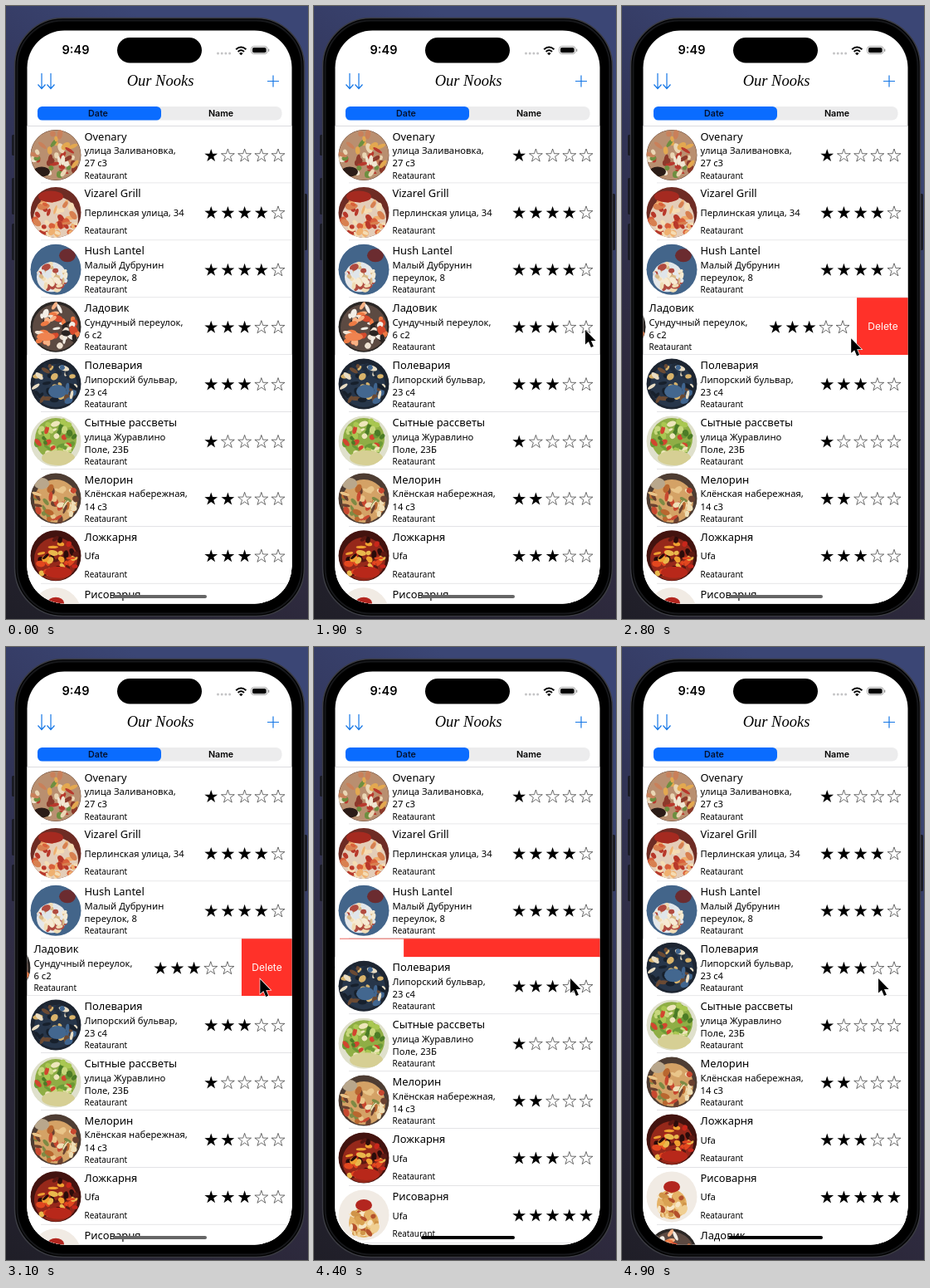
Recreate the animation shown at these times as an HTML page. Size 364x738 px, loop 5.1 s.

```html
<!DOCTYPE html>
<html lang="ru">
<head>
<meta charset="utf-8">
<style>
  html, body { margin: 0; width: 100%; height: 100%; overflow: hidden; background: #2b2d4e; }
  svg { display: block; width: 364px; height: 738px; }
  text { font-family: "Noto Sans", sans-serif; }
  .ui { font-family: Inter, sans-serif; }
  .name { font-size: 12.9px; }
  .address { font-size: 11.2px; }
  .kind { font-size: 9.9px; }
  .heading { font: italic 18.5px "Liberation Serif", serif; }
  .line { stroke: #d4d4d7; stroke-width: .8; }
  .icon { fill: none; stroke: #1677e6; stroke-width: 1.2; }
</style>
</head>
<body>
<svg id="stage" viewBox="0 0 364 738"></svg>
<script>
const LOOP = 5100, STEP = 100;
const TOP = 144.5, ROW = 68.9, LEFT = 25, RIGHT = 345, BUTTON = 61;
const SWIPED = 3;

// photo: background, plate [x, y, radius, colour], accent [x, y, rx, ry, colour], food colours
const places = [
  { name: 'Ovenary', address: ['улица Заливановка,', '27 с3'], stars: 1,
    photo: ['#6b4a38', [0, 0, 30, '#b98f70'], [-17, 20, 10, 6, '#2b1c17'],
      ['#ead6b4', '#b8382c', '#6d8f40', '#e3a850', '#8c3a2b', '#f1e6d2', '#c9805a']] },
  { name: 'Vizarel Grill', address: ['Перлинская улица, 34'], stars: 4,
    photo: ['#6e2c24', [0, 8, 27, '#e4cdb8'], [-6, -19, 15, 7, '#a52a20'],
      ['#d9603a', '#efb070', '#b8382a', '#f4dcb4', '#d88050']] },
  { name: 'Hush Lantel', address: ['Малый Дубрунин', 'переулок, 8'], stars: 4,
    photo: ['#43658a', [-5, 9, 18, '#e6e8ea'], [14, -17, 10, 8, '#6b2c30'],
      ['#f0dcb4', '#f6ead2', '#d9b987', '#b04a3f', '#dfe5ea']] },
  { name: 'Ладовик', address: ['Сундучный переулок,', '6 с2'], stars: 3,
    photo: ['#2b2725', [0, 1, 28, '#5c4a42'], [-12, 12, 11, 5, '#ef8350'],
      ['#ee7a43', '#f3eee6', '#d64a2c', '#f7b184', '#2a2422', '#f0e2d2']] },
  { name: 'Полевария', address: ['Липорский бульвар,', '23 с4'], stars: 3,
    photo: ['#1d2531', [0, 2, 26, '#27364a'], [2, 9, 11, 8, '#43678f'],
      ['#40658f', '#d9b36a', '#17202c', '#e9ddc4', '#6b4a33', '#202c3c']] },
  { name: 'Сытные рассветы', address: ['улица Журавлино', 'Поле, 23Б'], stars: 1,
    photo: ['#dfe0cc', [0, -3, 25, '#8fae45'], [3, 20, 20, 9, '#d6cf94'],
      ['#6a9a36', '#a9c751', '#d2452f', '#4c7c26', '#eee6bb', '#c7d77c']] },
  { name: 'Мелорин', address: ['Клёнская набережная,', '14 с3'], stars: 2,
    photo: ['#4e3d33', [0, 3, 26, '#d4a266'], [-17, -18, 9, 7, '#b9a78c'],
      ['#e9c58a', '#c8482f', '#7d8a44', '#f0dfb6', '#b9672f', '#6a4130']] },
  { name: 'Ложкарня', address: ['Ufa'], stars: 3,
    photo: ['#43130f', [0, 4, 26, '#96281a'], [3, 20, 16, 7, '#b8281a'],
      ['#e2471f', '#f0a030', '#2b0c0a', '#c8261b', '#e9b84c', '#5c1812']] },
  { name: 'Рисоварня', address: ['Ufa'], stars: 5,
    photo: ['#f1ebe4', [0, 9, 18, '#e5b266'], [0, -12, 10, 7, '#b3261f'],
      ['#f0cf92', '#d09448', '#f7e7c6', '#d9a152', '#b4502c']] }
];
places.push(places[SWIPED]);

function random(seed) {
  return () => (seed = seed * 16807 % 2147483647) / 2147483647;
}

const ellipse = (rx, ry, fill, x, y, turn = 0) =>
  `<ellipse rx="${rx}" ry="${ry}" fill="${fill}" transform="translate(${x} ${y}) rotate(${turn})"/>`;

function photo([back, [px, py, pr, plate], [ax, ay, arx, ary, accent], foods], seed) {
  const rnd = random(seed);
  let art = ellipse(31, 31, back, 0, 0) + ellipse(pr, pr, plate, px, py);
  for (let i = 0; i < 44; i++) {
    const angle = rnd() * 7, reach = Math.sqrt(rnd()) * (pr - 1);
    const x = px + reach * Math.cos(angle), y = py + reach * Math.sin(angle);
    art += ellipse(2.5 + rnd() * 4, 1.5 + rnd() * 2.5, foods[i % foods.length], x, y, rnd() * 180);
  }
  art += ellipse(arx, ary, accent, ax, ay);
  return `<g transform="translate(60 35)" clip-path="url(#disc)">${art}</g>`;
}

function star(x, filled) {
  const points = Array.from({ length: 10 }, (_, i) => {
    const r = i % 2 ? 3.2 : 8.3, a = i * Math.PI / 5;
    return `${x + r * Math.sin(a)},${35.8 - r * Math.cos(a)}`;
  }).join(' ');
  return `<polygon points="${points}" ${filled ? 'fill="#000"' : 'fill="none" stroke="#333" stroke-width=".7"'}/>`;
}

const text = (kind, x, y, value, extra = '') =>
  `<text class="${kind}" x="${x}" y="${y}" ${extra}>${value}</text>`;

const rect = (x, y, w, h, fill, r = 0, extra = '') =>
  `<rect x="${x}" y="${y}" width="${w}" height="${h}" rx="${r}" fill="${fill}" ${extra}/>`;

function cell(place, i) {
  const { name, address, stars } = place, single = address.length === 1;
  return `<g transform="translate(0 ${TOP + ROW * i})">
    ${rect(LEFT, 0, RIGHT - LEFT, ROW, '#fff')}
    ${photo(place.photo, 911 * (places.indexOf(place) + 3))}
    ${text('name', 94.5, 17, name)}
    ${address.map((part, n) => text('address', 94.5, single ? 39.6 : 33.6 + 15.3 * n, part)).join('')}
    ${text('kind', 94.5, single ? 61 : 63, 'Reataurant')}
    ${[0, 1, 2, 3, 4].map(n => star(247.2 + 20.2 * n, n < stars)).join('')}
    <path class="line" d="M42 ${ROW - .3}H${RIGHT}"/>
  </g>`;
}

const cells = places.map(cell);
const swipeTop = TOP + ROW * SWIPED, belowTop = swipeTop + ROW;
const downArrow = x => `<path class="icon" d="M${x} 81V99M${x - 4.5} 94.5L${x} 99.5L${x + 4.5} 94.5"/>`;

stage.innerHTML = `
  <defs>
    <linearGradient id="dusk" x1=".4" x2="0" y2="1">
      <stop stop-color="#3b4675"/><stop offset=".3" stop-color="#313457"/>
      <stop offset=".6" stop-color="#2f2b40"/><stop offset="1" stop-color="#1f1e27"/>
    </linearGradient>
    <clipPath id="disc"><circle r="30.5"/></clipPath>
    <clipPath id="screen"><rect x="25.5" y="29.5" width="319" height="690" rx="45"/></clipPath>
  </defs>
  ${rect(0, 0, 364, 738, 'url(#dusk)')}
  ${[[7, 155, 25], [7, 207, 44], [7, 262, 44], [358, 226, 68]].map(([x, y, h]) => rect(x, y, 5, h, '#191a22', 1.5)).join('')}
  ${rect(10.5, 14.5, 349, 720, '#000', 58, 'stroke="#3a3b42" stroke-width="1.6"')}
  ${rect(13.5, 17.5, 343, 714, '#000', 55, 'stroke="#17181b" stroke-width="2"')}
  <g clip-path="url(#screen)">
    ${rect(LEFT, 29, RIGHT - LEFT, 691, '#fff')}
    ${cells.slice(0, SWIPED).join('')}
    <g id="swipe">
      ${cells[SWIPED]}
      ${rect(RIGHT, swipeTop, RIGHT - LEFT, ROW, '#ff3129')}
    </g>
    <g id="label">${text('ui', 314.5, swipeTop + 39, 'Delete', 'text-anchor="middle" font-size="12" fill="#fff"')}</g>
    <path id="edge" stroke="#e8564f" stroke-width=".9" d="M31 ${swipeTop}H${RIGHT}"/>
    <g id="below">${rect(LEFT, belowTop, RIGHT - LEFT, 460, '#fff')}${cells.slice(SWIPED + 1).join('')}</g>
    <path class="line" d="M${LEFT} ${TOP}H${RIGHT}"/>
    ${rect(129, 709, 113, 4, '#000', 2, 'id="home"')}
  </g>
  ${rect(134, 38, 102, 30.5, '#000', 15.2)}
  ${text('ui', 84, 58, '9:49', 'text-anchor="middle" font-size="14.5" font-weight="600"')}
  ${[255.5, 260.2, 264.9, 269.6].map(x => `<circle cx="${x}" cy="57" r="1.5" fill="#c4c4c6"/>`).join('')}
  <g fill="none" stroke="#000" stroke-width="2">
    <path d="M277.2 52.2Q283.3 46.8 289.4 52.2M279.6 54.9Q283.3 51.6 287 54.9"/>
  </g>
  <path d="M281 57Q283.3 55 285.6 57L283.3 59.3Z"/>
  ${rect(295.6, 48.6, 19.4, 9, '#fff', 3, 'stroke="#999" stroke-width=".9"')}
  ${rect(297, 50, 16.6, 6.2, '#000', 1.8)}
  ${rect(316, 51.5, 1.3, 3.4, '#999', .6)}
  ${downArrow(43)}${downArrow(54)}
  <path class="icon" d="M315 90.5H329M322 83.5V97.5"/>
  ${text('heading', 186, 96, 'Our Nooks', 'text-anchor="middle"')}
  ${rect(38, 121, 294.5, 16.5, '#ececed', 7)}
  ${rect(38, 121, 149, 16.5, '#0a6cff', 5.5)}
  ${text('ui', 111, 133, 'Date', 'text-anchor="middle" font-size="10.7" font-weight="600" fill="#04122e"')}
  ${text('ui', 259, 133, 'Name', 'text-anchor="middle" font-size="10.7" font-weight="600"')}
  <path id="cursor" d="M0 0V17.6L4 14L6.9 21L9.9 19.8L7 13H12.6Z" stroke="#fff" stroke-width="1.3" paint-order="stroke"/>`;

// time, x, y
const pointer = [
  [200, 374, 540], [800, 315, 454], [1700, 327, 390], [1900, 327, 390],
  [2400, 191, 401], [3000, 306, 400], [3500, 309, 399]
];
const [, , , dragStart, dragEnd] = pointer;
const slack = 23, deleteAt = 4300;

function pointerAt(t) {
  const next = pointer.findIndex(key => key[0] > t);
  if (next <= 0) return pointer.at(next).slice(1);
  const [t0, x0, y0] = pointer[next - 1], [t1, x1, y1] = pointer[next];
  const u = (t - t0) / (t1 - t0), e = u * u * (3 - 2 * u);
  return [x0 + (x1 - x0) * e, y0 + (y1 - y0) * e];
}

function swipeOffset(t, x, removed) {
  if (t < dragStart[0]) return 0;
  const dragged = at => Math.max(0, dragStart[1] - at - slack);
  if (t <= dragEnd[0]) return dragged(x);
  const settled = BUTTON + (dragged(dragEnd[1]) - BUTTON) * Math.exp((dragEnd[0] - t) / 100);
  return settled + (RIGHT - LEFT - BUTTON) * removed;
}

const move = (node, x, y) => node.setAttribute('transform', `translate(${x} ${y})`);
const show = (node, visible) => node.style.display = visible ? '' : 'none';
const [swipe, below, label, edge, home, cursor] =
  ['swipe', 'below', 'label', 'edge', 'home', 'cursor'].map(id => document.getElementById(id));

function draw(t) {
  const [x, y] = pointerAt(t);
  const removed = t > deleteAt ? 1 - Math.exp((deleteAt - t) / 88) : 0;
  const offset = swipeOffset(t, x, removed);
  move(cursor, x, y);
  move(swipe, -offset, 0);
  move(label, Math.max(0, BUTTON - offset), 0);
  move(below, 0, -ROW * removed);
  show(cursor, t >= pointer[0][0]);
  show(label, offset > 0 && !removed);
  show(edge, removed > 0 && removed < .98);
  show(swipe, removed < .98);
  home.setAttribute('fill', removed ? '#000' : '#666');
}

const start = performance.now();
function tick() {
  const t = (performance.now() - start) % LOOP;
  draw(Math.floor(t / STEP) * STEP);
  requestAnimationFrame(tick);
}
tick();
</script>
</body>
</html>
```
